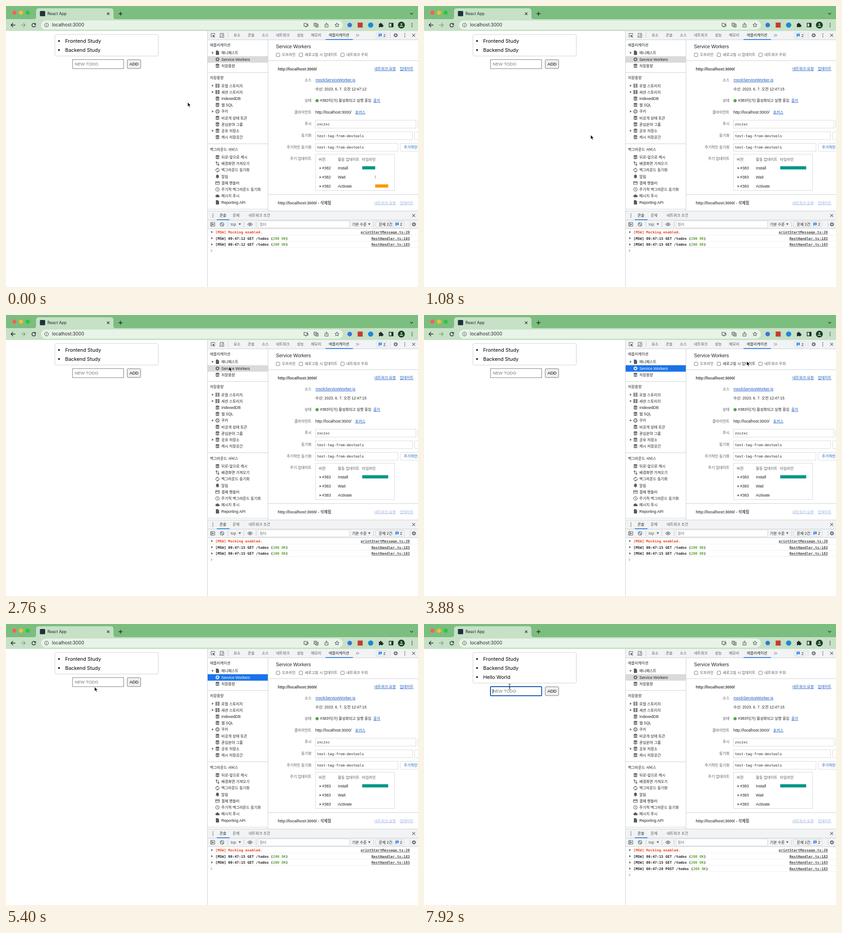
Recreate the animation shown at these times as an HTML page. Size 905 px wide and 619 px high, loop 8000 ms.

```html
<!DOCTYPE html>
<html lang="ko">
<head>
<meta charset="utf-8">
<title>Todo app with developer tools</title>
<style>
html, body { margin: 0; width: 100%; height: 100%; overflow: hidden; background: #fff; }
svg { display: block; width: 100vw; height: 100vh; font-family: "Liberation Sans", "Noto Sans CJK KR", sans-serif; }
.ui { font-family: Inter, "Noto Sans CJK KR", sans-serif; }
.mono { font-family: "DejaVu Sans Mono", monospace; }
</style>
</head>
<body>
<svg id="stage" viewBox="0 0 905 619"></svg>
<script>
const INK = '#202124', GRAY = '#565a60', LINE = '#cdd0d4', BLUE = '#1558c0', BAR = '#f1f3f4';
const LOOP = 8000, STEP = 40, ROW = 13.6;

// Text is placed by the middle of its line; Hangul runs a little smaller than Latin.
const text = (x, y, s, attrs = '') =>
  `<text x="${x}" y="${y + 3}" ${attrs} fill="${INK}" font-size="${/[가-힣]/.test(s) ? 8.15 : 8.6}">${s}</text>`;
const link = (x, y, s, attrs = '') => text(x, y, s, `text-decoration="underline" ${attrs} fill="${BLUE}"`);
const mono = (x, y, s, attrs = '') => text(x, y, s, `class="mono" font-size="7.79" ${attrs}`);
const rect = (x, y, w, h, fill, attrs = '') =>
  `<rect x="${x}" y="${y}" width="${w}" height="${h}" fill="${fill}" ${attrs}/>`;
const box = (x, y, w, h, r = 0, fill = '#fff') => rect(x, y, w, h, fill, `stroke="#d6d9dc" rx="${r}"`);
const hline = (x, y, x2 = 905, c = LINE) => `<path d="M${x} ${y}H${x2}" stroke="${c}"/>`;
const vline = (x, y, y2, c = LINE) => `<path d="M${x} ${y}V${y2}" stroke="${c}"/>`;
const circle = (x, y, r, fill, attrs = '') => `<circle cx="${x}" cy="${y}" r="${r}" fill="${fill}" ${attrs}/>`;
const at = (x, y, body, c = GRAY) => `<g transform="translate(${x} ${y})" fill="${c}" color="${c}">${body}</g>`;
const solid = d => `<path d="${d}"/>`;
const stroke = (d, w = 1.2) => `<path d="${d}" fill="none" stroke="currentColor" stroke-width="${w}"/>`;
const ring = (r, w = 1.2, extra = '') => circle(0, 0, r, 'none', `stroke="currentColor" stroke-width="${w}" ${extra}`);
const dots = [-3.5, 0, 3.5].map(y => circle(0, y, 1, 'currentColor')).join('');
const cross = r => stroke(`M${-r} ${-r}L${r} ${r}M${r} ${-r}L${-r} ${r}`);
const tri = (x, y) => at(x, y, solid('M-1.6-2.5L2 0-1.6 2.5z'));
const chat = at(0, 0, solid('M-3.5-3.5h7v5.5h-5l-2 2z') + '<path d="M-2-1.7h4M-2 .2h4" stroke="#fff" stroke-width=".8"/>', '#1a73e8');

const icons = {
  file: solid('M-3.5-4.7H1L3.5-2v6.7h-7z'),
  gear: ring(2.6, 1.5) + ring(3.9, 1.4, 'stroke-dasharray="1.53"'),
  db: '<ellipse cy="-3" rx="4" ry="1.5"/>' + solid('M-4-1.6q4 2.2 8 0v1.5q-4 2.2-8 0zM-4 1.2q4 2.2 8 0v1.9q-4 2.4-8 0z'),
  grid: stroke('M-4.5-3h4m1 0h4M-4.5 0h4m1 0h4M-4.5 3h4m1 0h4', 2.1),
  cookie: ring(3.8, 1.3) + circle(-1.3, -1, .9, 'currentColor') + circle(1.2, .9, 1, 'currentColor') + circle(1.3, -1.8, .8, 'currentColor') + circle(-1.2, 1.7, .7, 'currentColor'),
  updown: stroke('M-2 3V-4M-4-2l2-2 2 2M2-3V4M0 2l2 2 2-2'),
  sync: stroke('M-3.2 1.7A3.6 3.6 0 0 1 1-3.4M3.2-1.7A3.6 3.6 0 0 1-1 3.4', 1.3) + solid('M.2-5.3v4L2.6-3.3zM-.2 5.3v-4L-2.6 3.3z'),
  bell: solid('M-4 2.6h8L3 1.2v-2.4a3 3 0 0 0-6 0v2.4zM-1.2 3.2h2.4v1.2h-2.4z'),
  card: stroke('M-4.2-3.2h8.4v6.4h-8.4z', 1) + rect(-4, -1.7, 8, 1.5, 'currentColor'),
  clock: ring(4, 1) + stroke('M0-2.3V.3l1.8 1', 1),
  cloud: solid('M-2.6 3h5.4a1.9 1.9 0 0 0 .2-3.8a3 3 0 0 0-5.7-.7a2.3 2.3 0 0 0 .1 4.5z'),
};
const refresh = stroke('M3.4-2A4 4 0 1 0 4 .8', 1.4) + solid('M4.6-4.6V-.6H.6z');

function browserBar() {
  const K = '#20262a';
  return rect(0, 0, 905, 30, '#7cbd80')
    + circle(18.5, 14.7, 4.5, '#fe5f57') + circle(33, 14.7, 4.5, '#febc2e') + circle(47.5, 14.7, 4.5, '#28c840')
    + rect(0, 29, 905, 26, '#c6e1c6')
    + '<path d="M61 29q5 0 5-5V11q0-6 6-6H230q6 0 6 6V24q0 5 5 5z" fill="#c6e1c6"/>'
    + rect(74.5, 11, 11.5, 11.5, '#20303c', 'rx="1.5"')
    + text(91, 16.8, 'React App', `class="ui" font-size="8.6" fill="${K}"`)
    + at(224.5, 17, cross(2.6), K) + at(251.5, 17, stroke('M-4.3 0H4.3M0-4.3V4.3', 1.4), K)
    + at(891, 17, stroke('M-3-1.6L0 1.4 3-1.6', 1.3), K)
    + at(15.5, 42, stroke('M5 0H-4M0-4.4L-4.4 0 0 4.4', 1.4), K)
    + at(38, 42, stroke('M-5 0H4M0-4.4L4.4 0 0 4.4', 1.4), '#82a385')
    + `<g id="reload">${at(61, 42, refresh, K)}</g><g id="stop">${at(61, 42, cross(3.6), K)}</g>`
    + rect(77, 32, 663, 20, '#e8f3e8', 'rx="10"')
    + at(89, 42, ring(4.3, 1) + stroke('M0-2.3V-1.1M0-.3V2.4', 1.1), '#4a534c')
    + text(101, 42.4, 'localhost:3000', `class="ui" font-size="10" fill="${K}"`)
    + at(659, 42, stroke('M1-3.8H-4.4V2.5H4.4V0M-2 4.2H2M2.8-4.5V0M.8-1.8l2 2 2-2', 1.1), '#444d46')
    + at(681, 42, stroke('M-4.5-4.2H1.5V2H-4.5zM2-2H4.8V4.5H-1V2', 1) + stroke('M-3-2H0M-1.5-3V-2M0-2Q-1 0-3 .7M.7 3L2 0 3.6 3', .8), '#444d46')
    + at(704, 42, stroke('M-1.5-1.2H-3.5V4.5H3.5V-1.2H1.5M0 2V-4.5M-2-2.7L0-4.7 2-2.7', 1), '#444d46')
    + at(727, 42, stroke('M0-4.6L1.3-1.5 4.6-1.3 2.1.8 2.9 4.1 0 2.3-2.9 4.1-2.1.8-4.6-1.3-1.3-1.5z', 1), '#444d46')
    + circle(755, 42, 5, '#3874e0') + rect(772.5, 36.5, 11, 11, '#c53b31') + circle(801, 42, 5.8, '#1c87d8')
    + at(823.5, 42, solid('M-4.5-2.8h2.6a1.6 1.6 0 1 1 3 0H3.7V0a1.6 1.6 0 1 1 0 3V4.7H.9a1.6 1.6 0 0 0-3 0h-2.4V2a1.5 1.5 0 0 0 0-2.6z'), K)
    + at(846, 42, stroke('M-4.4-4H4.4V4H-4.4z', 1.3) + rect(.5, -4, 4, 8, K), K)
    + circle(868.5, 42, 7.6, '#1e3a2a') + at(868.5, 42, circle(0, -2, 2.1, 'currentColor') + solid('M-4 4q0-3 4-3t4 3z'), '#8fc79a')
    + at(892, 42, dots, K);
}

function page() {
  const todo = (y, s) => circle(116.5, y + .3, 1.9, '#111') + text(130, y + 1, s, 'class="ui" font-size="10.9" fill="#000"');
  return `<g id="page"><rect id="list" x="107.5" y="62.8" width="227" rx="3" fill="#fff" stroke="#d0d0d0"/>`
    + todo(76.7, 'Frontend Study') + todo(96.7, 'Backend Study') + `<g id="added">${todo(116.7, 'Hello World')}</g>`
    + `<g id="form"><rect id="field" x="146.1" y="118" width="112.3" height="20" fill="#fff"/>`
    + text(151, 128.3, 'NEW TODO', 'id="hint" font-size="9.44" fill="#757575"')
    + text(151, 128.3, '', 'id="typed" font-size="9.44" fill="#000"')
    + rect(0, 123, 1, 10, '#000', 'id="caret"')
    + rect(266.3, 118.2, 29.5, 19.6, '#efefef', 'rx="2" stroke="#767676"')
    + text(271.2, 128.3, 'ADD', 'font-size="9.44" fill="#000"') + '</g></g>';
}

function toolTabs() {
  const tabs = [[500, '요소'], [531, '콘솔'], [562, '소스'], [593, '네트워크'], [639, '성능'], [670, '메모리']];
  return rect(443, 55, 462, 19, BAR) + hline(443, 74.5)
    + at(454.5, 64.5, stroke('M-1 3.5H-4V-4H4V-1', 1) + solid('M-1.3-1.3L5 1.2 2.4 2.2 4.6 4.4 3.8 5.2 1.6 3 .8 5z'))
    + at(473.5, 64.5, stroke('M-3 3.8V-4.2H4.5V-2M-5 4.2H0M1-1.2H4.8V4.6H1z', 1)) + vline(487.5, 58, 71)
    + tabs.map(([x, s]) => text(x, 64.3, s, `fill="${GRAY}"`)).join('')
    + text(709, 64.3, '애플리케이션') + rect(702, 73, 60, 1.6, '#1a73e8')
    + at(772, 64.5, stroke('M-3-2.7L-.3 0-3 2.7M.5-2.7L3.2 0 .5 2.7', 1))
    + box(813, 58.3, 24, 12.5, 2, BAR) + `<g transform="translate(822 64.5)">${chat}</g>` + text(829, 64.5, '2')
    + vline(843.5, 58, 71) + at(856, 64.5, icons.gear) + at(876, 64.5, dots) + at(895.5, 64.5, cross(3.2));
}

function sidebar() {
  const item = (y, icon, s, open) => (open ? tri(454, y) : '') + at(464.5, y, icons[icon]) + text(473, y, s);
  const rows = [
    [103, 'file', '매니페스트', 1], [131.7, 'db', '저장용량'],
    [175.5, 'grid', '로컬 스토리지', 1], [189.6, 'grid', '세션 스토리지', 1], [204, 'db', 'IndexedDB'], [218, 'db', '웹 SQL'],
    [232.3, 'cookie', '쿠키', 1], [246.5, 'db', '비공개 상태 토큰'], [260.7, 'db', '관심분야 그룹'], [274.7, 'db', '공유 저장소', 1], [289, 'db', '캐시 저장공간'],
    [333, 'db', '뒤로-앞으로 캐시'], [347.2, 'updown', '배경화면 가져오기'], [361.4, 'sync', '백그라운드 동기화'], [375.6, 'bell', '알림'],
    [389.8, 'card', '결제 핸들러'], [404, 'clock', '주기적 백그라운드 동기화'], [418.2, 'cloud', '메시지 푸시'], [432.5, 'file', 'Reporting API']];
  return text(448, 86, '애플리케이션') + text(448, 158, '저장용량') + text(448, 315.5, '백그라운드 서비스')
    + [146.5, 303.5, 447.5].map(y => hline(443, y, 575)).join('')
    + rect(443, 110.6, 132, 14.2, '#dadada', 'id="selected"')
    + `<g id="idle">${item(117.6, 'gear', 'Service Workers')}</g>`
    + `<g id="active">${at(464.5, 117.6, icons.gear, '#fff') + text(473, 117.6, 'Service Workers', 'fill="#fff"')}</g>`
    + rows.map(r => item(...r)).join('') + vline(575.5, 75, 451);
}

function workers() {
  const ver = '#<tspan class="ver">382</tspan>';
  const check = (x, s, id) => rect(x - 3.8, 103.8, 7.6, 7.6, '#fff', 'stroke="#767676" rx="1.5"')
    + text(x + 8.5, 107.3, s, `id="${id}" fill="${GRAY}"`);
  const label = (y, s) => text(671, y, s, `text-anchor="end" fill="${GRAY}"`);
  const field = (y, w, s) => box(679.5, y - 8.5, w, 17.5) + mono(683, y, s);
  const version = (y, s) => tri(690.5, y + .8) + text(694.5, y, ver) + text(729, y, s);
  return text(593, 89.7, 'Service Workers', 'font-size="10.5"')
    + check(597.5, '오프라인', 'offline') + check(647.7, '새로고침 시 업데이트', 'update') + check(739.2, '네트워크 우회', 'bypass')
    + hline(576, 120.5)
    + text(597, 138.7, 'http://localhost:3000/', 'font-weight="bold" fill="#444"') + link(809, 138.3, '네트워크 요청') + link(865, 138.3, '업데이트')
    + label(163, '소스') + link(680, 163, 'mockServiceWorker.js', 'font-size="8.85"')
    + text(679.5, 182.7, '수신: 2023. 6. 7. 오전 12:47:<tspan class="sec">12</tspan>', 'font-size="8.4"')
    + label(208.3, '상태') + circle(683.3, 208.5, 3.5, '#55a455') + text(690, 208.3, ver + '이(가) 활성화되고 실행 중임') + link(807, 208.3, '중지')
    + label(234, '클라이언트') + text(679.5, 233.7, 'http://localhost:3000/') + link(767, 233.7, '포커스')
    + label(259.3, '푸시') + field(260, 221, 'zxczxc') + box(904.5, 251.5, 20, 17.5, 2)
    + label(285, '동기화') + field(285.5, 213.5, 'test-tag-from-devtools') + box(897.5, 277, 20, 17.5, 2)
    + label(310.5, '주기적인 동기화') + field(311, 181.5, 'test-tag-from-devtools') + box(866, 302.5, 60, 17.5, 2)
    + text(874, 310.5, '주기적인 동기화', `font-weight="500" fill="${BLUE}"`)
    + label(336, '주기 업데이트') + box(680, 326.5, 173.5, 80)
    + [[687, '버전'], [729, '활동 업데이트'], [782, '타임라인']].map(([x, s]) => text(x, 337.7, s, `fill="${GRAY}"`)).join('')
    + version(356.5, 'Install') + version(376.5, 'Wait') + version(396.5, 'Activate')
    + rect(782.5, 353, 57, 7, '#009688', 'id="install"')
    + `<g id="later">${rect(810.6, 373.3, .9, 6.6, '#777') + rect(811, 393, 28.5, 7, '#ff9800')}</g>`
    + hline(576, 415.5)
    + text(597, 433.7, 'http://localhost:3000/ - 삭제됨', 'font-size="8.6" font-weight="bold" fill="#555"')
    + `<g opacity=".45">${link(809, 433.5, '네트워크 요청') + link(865, 433.5, '업데이트')}</g>`;
}

function drawer() {
  const log = (i, msg, src, color = INK) => {
    const y = 498 + i * ROW;
    return `<g id="log${i}">${tri(452.5, y) + mono(460, y, msg, `font-weight="bold" fill="${color}"`)
      + mono(887, y, src, 'font-weight="bold" text-anchor="end" text-decoration="underline" fill="#4a4a4a"')
      + hline(443, y + 6.7, 905, '#f0f0f0')}</g>`;
  };
  const ok = '(<tspan fill="#57a02c">200 OK</tspan>)';
  const get = `[MSW] 00:47:<tspan class="sec">12</tspan> GET /todos ${ok}`;
  const down = (x, y) => at(x, y, solid('M-2.5-2h5L0 2.3z'));
  return rect(443, 451, 462, 168, '#fff') + rect(443, 451, 462, 39.5, BAR)
    + hline(443, 451.5) + hline(443, 471.5) + hline(443, 490.5)
    + at(454.5, 461.7, dots) + text(469, 461.3, '콘솔') + rect(463, 470, 28, 1.6, '#1a73e8')
    + text(498, 461.3, '문제', `fill="${GRAY}"`) + text(533, 461.3, '네트워크 조건', `fill="${GRAY}"`) + at(895.5, 461.5, cross(3.2))
    + at(454, 481, stroke('M-4.5-4H4.5V4H-4.5zM-2.3-4V4', 1) + solid('M-.8-2.3L3 0-.8 2.3z'))
    + at(474.5, 481, ring(4, 1.2) + stroke('M-2.8-2.8L2.8 2.8', 1.2))
    + [487.5, 522.5, 549.5, 807.5, 887.5].map(x => vline(x, 474.5, 487.5)).join('')
    + text(493.5, 480.7, 'top', `fill="${GRAY}"`) + down(513.5, 480.7)
    + at(536, 481, stroke('M-5 0Q0-6.5 5 0 0 6.5-5 0z', 1.2) + circle(0, 0, 1.7, 'currentColor'))
    + box(554, 473.5, 200.5, 15) + text(557, 480.7, '필터', 'fill="#757575"')
    + text(760, 480.7, '기본 수준') + down(798, 480.7)
    + box(811.5, 474.5, 63, 13, 2, BAR) + text(819, 480.7, '문제 2건:') + `<g transform="translate(859 480.8)">${chat}</g>` + text(865.5, 480.7, '2')
    + at(896, 481, icons.gear)
    + log(0, '[MSW] Mocking enabled.', 'printStartMessage.ts:20', '#e8461c') + log(1, get, 'RestHandler.ts:183') + log(2, get, 'RestHandler.ts:183')
    + log(3, `[MSW] 00:47:28 POST /todos ${ok}`, 'RestHandler.ts:183')
    + `<g id="prompt">${at(451.5, 498.3, stroke('M-1.5-2.5L1.3 0-1.5 2.5', 1), '#3b82e0')}</g>`;
}

const pointer = '<g id="arrow"><path d="M0 0V9.6L2.2 7.6 3.8 11.2 5.5 10.5 3.9 7H6.9z" fill="#000" stroke="#fff" stroke-width=".8"/></g>'
  + '<g id="beam"><path d="M-2.3-5.8Q0-5.8 0-4.4V4.4Q0 5.8-2.3 5.8M2.3-5.8Q0-5.8 0-4.4M0 4.4Q0 5.8 2.3 5.8M-1.3 1.6H1.3" fill="none" stroke="#222" stroke-width="1"/></g>';

document.getElementById('stage').innerHTML = rect(0, 0, 905, 619, '#fff') + page()
  + rect(443, 55, 462, 564, '#fff') + toolTabs() + sidebar() + workers() + drawer() + vline(442.5, 55, 619)
  + browserBar() + `<g id="pointer">${pointer}</g>`;

const $ = id => document.getElementById(id);
const show = (id, on) => $(id).setAttribute('visibility', on ? 'inherit' : 'hidden');
const set = (id, attrs) => { for (const k in attrs) $(id).setAttribute(k, attrs[k]); };
const fill = (cls, s) => document.querySelectorAll('.' + cls).forEach(e => e.textContent = s);
const within = (t, a, b) => t >= a && t < b;

const PATH = [[0, 399, 212], [40, 399, 212], [440, 61, 44], [600, 61, 44], [1080, 366, 284], [1400, 322, 372],
  [1480, 272, 372], [1960, 272, 372], [2760, 490, 114], [3240, 490, 114], [3880, 709, 102], [4040, 744, 190],
  [4200, 744, 190], [5000, 545, 546], [5040, 545, 546], [5400, 194.5, 138.5], [5480, 188, 130], [7040, 188, 130],
  [7280, 282, 129], [7440, 282, 129], [7840, 188, 138], [8000, 188, 138]];

// Hermite curve through the path; the pointer rests where two neighbours coincide.
function slope(i, k) {
  const a = PATH[i - 1], p = PATH[i], b = PATH[i + 1];
  const same = q => !q || (q[1] === p[1] && q[2] === p[2]);
  return same(a) || same(b) ? 0 : (b[k] - a[k]) / (b[0] - a[0]);
}
function pointerAt(t) {
  const i = PATH.findIndex((p, n) => n === PATH.length - 1 || t < PATH[n + 1][0]);
  const a = PATH[i], b = PATH[i + 1], d = b[0] - a[0], u = (t - a[0]) / d;
  return [1, 2].map(k => a[k] + (b[k] - a[k]) * u * u * (3 - 2 * u)
    + d * u * (1 - u) * (slope(i, k) * (1 - u) - slope(i + 1, k) * u));
}

function draw(t) {
  const reloaded = t >= 840, added = t >= 7440, shift = added ? 20 : 0;
  const focus = within(t, 5480, 7360) || t >= 7920, blue = within(t, 2800, 5480);
  const [x, y] = pointerAt(t);

  fill('ver', reloaded ? 383 : 382);
  fill('sec', reloaded ? 15 : 12);
  set('install', { width: reloaded ? 57 : 28.5 });
  show('later', !reloaded);
  show('reload', !within(t, 600, 960));
  show('stop', within(t, 600, 960));

  const count = within(t, 640, 840) ? 0 : added ? 4 : 3;
  for (let i = 0; i < 4; i++) show('log' + i, i < count);
  set('prompt', { transform: `translate(0 ${count * ROW})` });

  show('page', !within(t, 640, 800));
  show('added', added);
  set('list', { height: 47.4 + shift });
  set('form', { transform: `translate(0 ${shift})` });
  set('field', { stroke: focus ? '#0f5ab8' : '#767676', 'stroke-width': focus ? 2 : 1, rx: focus ? 1.5 : 0 });

  const letters = t < 5920 || added ? 0 : t < 6160 ? 1 : Math.min(11, 2 + Math.floor((t - 6160) * 9 / 600));
  $('typed').textContent = 'Hello World'.slice(0, letters);
  show('hint', !letters);
  show('caret', focus && !within(t, 5760, 5920));
  set('caret', { x: 151 + (letters ? $('typed').getComputedTextLength() - .4 : 0) });

  set('selected', { fill: blue ? '#1a73e8' : '#dadada' });
  show('idle', !blue);
  show('active', blue);
  set('update', { fill: within(x, 643, 728) && within(y, 101, 114) ? INK : GRAY });

  const beam = within(x, 146, 259) && within(y, 117.8 + shift, 138.2 + shift);
  set('pointer', { transform: `translate(${x} ${y})` });
  show('pointer', !within(t, 5920, 7040));
  show('arrow', !beam);
  show('beam', beam);
}

function tick() {
  draw(Math.floor(performance.now() % LOOP / STEP) * STEP);
  requestAnimationFrame(tick);
}
tick();
</script>
</body>
</html>
```
